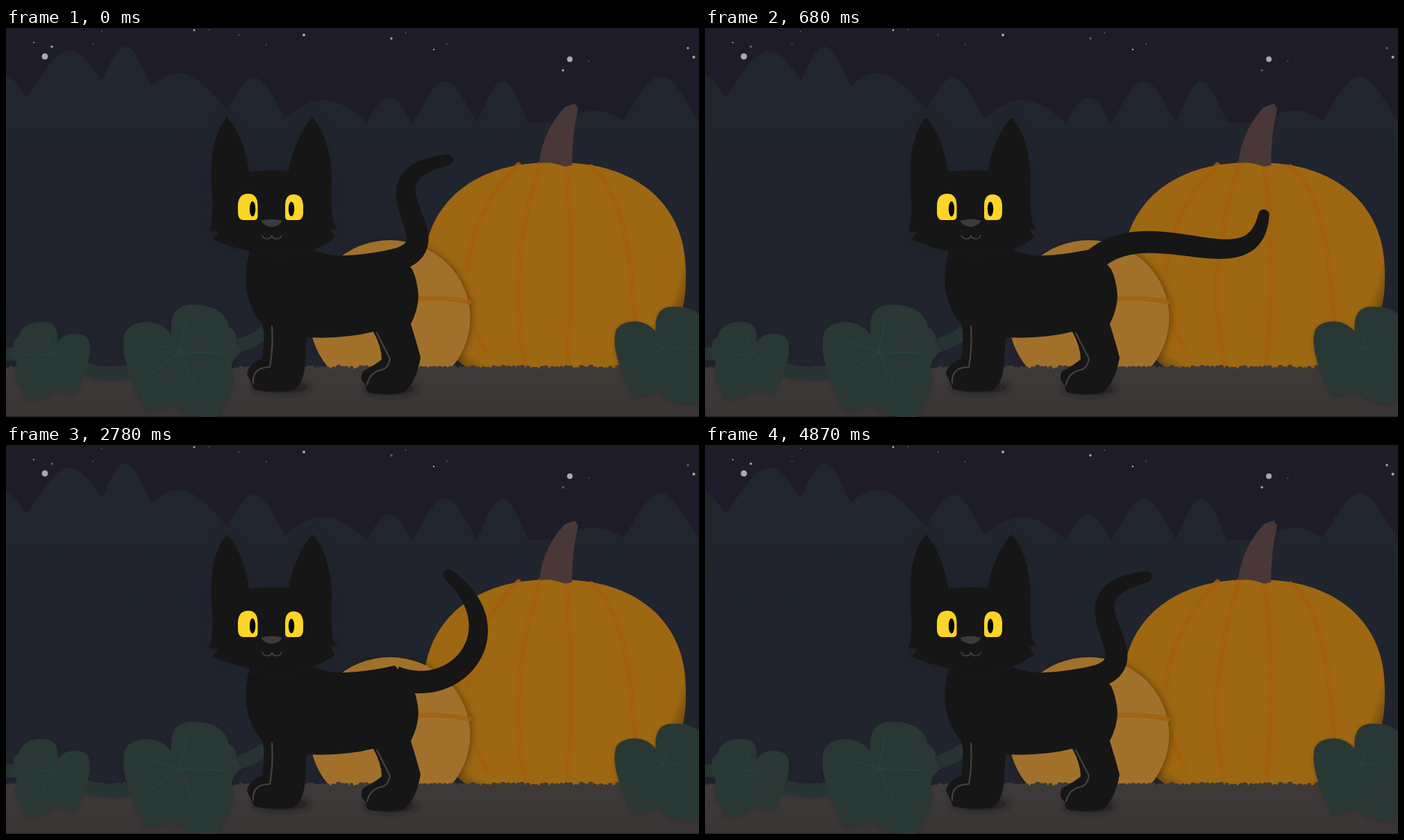
An HTML page for the animation above (5000 ms loop, 998 by 561 pixels).

```html
<!DOCTYPE html>
<html lang="en">
<head>
<meta charset="utf-8">
<title>Night cat</title>
<style>
html, body { margin: 0; width: 100%; height: 100%; overflow: hidden; background: #1f1c29; }
svg { display: block; width: 100%; height: 100%; }
.line { fill: none; stroke-linecap: round; stroke-linejoin: round; }
.leaf { fill: #293735; }
.vein { stroke: #24433c; stroke-width: 2; }
.vine { stroke: #263433; stroke-width: 19; stroke-linecap: butt; }
.rib { stroke: #a3600f; stroke-width: 7; opacity: .8; }
.grey { stroke: #434343; stroke-width: 2.2; }
.plants { filter: drop-shadow(0 2px 3px rgba(0,0,0,.15)); }
.small { filter: drop-shadow(2px 0 5px rgba(40,20,0,.45)); }
.head { filter: drop-shadow(0 0 7px rgba(30,28,46,.5)); }
</style>
</head>
<body>
<svg viewBox="0 0 998 561" preserveAspectRatio="none">
  <defs>
    <linearGradient id="night" x2="0" y2="1">
      <stop stop-color="#21272f"/><stop offset=".35" stop-color="#20242e"/><stop offset="1" stop-color="#21242f"/>
    </linearGradient>
    <linearGradient id="soil" x2="0" y2="1"><stop stop-color="#3e3a39"/><stop offset="1" stop-color="#393534"/></linearGradient>
    <radialGradient id="shade" gradientUnits="userSpaceOnUse" cx="780" cy="310" r="245">
      <stop offset=".8" stop-color="#9e6711"/><stop offset="1" stop-color="#2f200d"/>
    </radialGradient>
    <filter id="blur" x="-30%" y="-100%" width="160%" height="300%"><feGaussianBlur stdDeviation="5"/></filter>
    <g id="leaf">
      <path class="leaf" d="M-79-27Q-72-43-45-43Q-26-42-12-26Q-16-68 18-68Q64-68 71-36Q80-31 82-22Q80-14 90-1Q72 14 75 27Q82 50 62 76Q58 96 48 96Q10 94-9 74Q-40 86-50 83Q-66 50-69 40Q-86 0-79-27Z"/>
      <path class="line vein" d="M0 0L-45-15M0 0L9-42M0 0L62 2M0 0L22 49M0 0L-39 30"/>
    </g>
  </defs>

  <rect width="998" height="561" fill="#1f1c29"/>
  <path id="mountains" fill="url(#night)"/>
  <g id="stars" fill="#a9a9ad"></g>

  <path id="pumpkin" fill="url(#shade)"/>
  <g class="line rib">
    <path d="M738 197Q672 262 664 350M672 415Q676 440 692 468M770 195C752 250 737 320 737 390Q739 440 748 488"/>
    <path d="M806 201C816 270 817 400 808 490M843 200C885 232 900 320 906 425"/>
  </g>
  <path fill="#4a3839" d="M768 195Q773 148 805 114L819 109L824 116Q815 155 815 198L805 200Q785 192 768 195Z"/>
  <g class="small">
    <ellipse cx="553" cy="418" rx="115.5" ry="112" fill="#a1712b"/>
    <path class="line rib" d="M592 390Q630 388 667 395"/>
  </g>

  <path class="line vine" d="M325 459Q350 457 374 438"/>
  <g id="ground" fill="#3e3a39">
    <path fill="url(#soil)" d="M0 491H998V561H0Z"/>
  </g>
  <rect y="560" width="998" height="1" fill="#252423"/>

  <g class="plants">
    <path class="line vine" d="M-5 470H18M108 490Q140 502 176 497"/>
    <use href="#leaf" transform="translate(66 470) scale(-.68 .68)"/>
    <use href="#leaf" transform="translate(250 467)"/>
    <use href="#leaf" transform="translate(946 460) scale(.86)"/>
  </g>

  <g fill="#171515" opacity=".7" filter="url(#blur)">
    <ellipse cx="396" cy="518" rx="42" ry="9"/><ellipse cx="554" cy="521" rx="38" ry="9"/>
  </g>
  <g fill="#161616">
    <path id="tail"/>
    <path d="M352 320Q343 345 346 375Q350 405 369 427Q374 440 369 477Q349 484 347 499Q354 512 357 521Q385 527 414 523Q430 512 431 480L433 446Q485 449 529 438Q541 460 541 478Q530 487 514 495Q508 508 519 515Q516 527 530 527Q560 530 574 525Q592 508 597 475Q591 452 583 427Q594 405 594 385Q592 362 585 348L560 318L546 321Q515 327 490 328Q465 330 441 319Z"/>
    <path class="head" d="M350 207Q378 204 407 206C413 175 424 149 441 129C458 147 467 175 469 215Q467 255 471 280L477 289L467 291L474 302Q460 313 441 320Q395 335 352 322Q322 316 298 305L306 294L293 293Q299 270 297 245Q294 210 297 185C300 160 307 142 318 129C335 147 345 175 350 207Z"/>
    <path class="line grey" d="M383 430Q385 462 380 489Q366 489 360 496Q355 503 356 512M534 440L553 477Q550 492 540 493Q524 497 520 514"/>
    <path fill="#3b3b3b" d="M367 278Q383 273 398 278Q393 286 383 287Q372 286 367 278Z"/>
    <path class="line grey" style="stroke-width:1.6" d="M369 299Q371 304 376 304Q382 304 383 299Q384 304 390 304Q395 304 397 299"/>
    <g class="eye" data-x="351">
      <path fill="#fdd526" d="M334 257Q334 239 349 239Q362 239 362.500 256V272Q362 277 357 277H342Q334 277 334 265Z"/>
      <ellipse cx="355" cy="261" rx="4.2" ry="11" fill="#050505"/>
    </g>
    <g class="eye" data-x="412">
      <path fill="#fdd526" d="M402 257Q402 240 414 240Q428 240 428 258V265Q428 277 420 277H407Q402 277 402 272Z"/>
      <ellipse cx="411" cy="261" rx="4.2" ry="10.500" fill="#050505"/>
    </g>
  </g>
</svg>
<script>
const LOOP = 5000;
const byId = id => document.getElementById(id);
const clamp = x => Math.max(0, Math.min(1, x));
const ease = x => { x = clamp(x); return x * x * (3 - 2 * x); };

let seed = 7;
const random = () => (seed = seed * 16807 % 2147483647) / 2147483647;

function addCircle(parent, cx, cy, r) {
  const el = document.createElementNS('http://www.w3.org/2000/svg', 'circle');
  for (const [k, v] of Object.entries({ cx, cy, r })) el.setAttribute(k, v);
  return byId(parent).appendChild(el);
}

// Skyline: the highest of several bell-shaped mountains [x, top, width]
const mountains = [
  [-8, 66, 62], [92, 33, 65], [172, 27, 44], [248, 65, 88], [357, 72, 52], [457, 104, 105],
  [552, 100, 50], [632, 77, 52], [715, 77, 42], [848, 119, 108], [943, 70, 58]
];
let skyline = 'M0 561';
for (let x = 0; x <= 998; x += 2) {
  skyline += `L${x} ${Math.min(...mountains.map(([cx, top, w]) => top + 110 * (1 - Math.exp(-(((x - cx) / w) ** 2)))))}`;
}
byId('mountains').setAttribute('d', skyline + 'L998 561Z');

// The pumpkin is a superellipse
const power = v => Math.sign(v) * Math.abs(v) ** (2 / 2.3);
let outline = [];
for (let a = 0; a < 2 * Math.PI; a += .03) {
  outline.push([790 + 189 * power(Math.cos(a)), 358 + 164 * power(Math.sin(a))]);
}
byId('pumpkin').setAttribute('d', `M${outline.join('L')}Z`);

for (let x = 0; x < 885; x += 7) addCircle('ground', x + 3 * random(), 490 + 3 * random(), 3 + 2 * random());

for (const star of [[56, 41, 4.5], [812, 45, 4], [429, 10, 2], [990.5, 42, 2], [271, 3, 1.5], [616, 31, 1.2], [40, 21, 1.1]]) {
  addCircle('stars', ...star);
}
for (let i = 0; i < 8; i++) addCircle('stars', 100 + 850 * random(), 50 * random(), .8).setAttribute('opacity', .7);
const twinkling = [[66, 27], [555, 15], [802, 61], [982, 29]].map(([x, y]) => addCircle('stars', x, y, 1.7));

// Tail poses: two handles and the tip of a Bézier curve from a fixed root
const root = [560, 335];
const rest = [655, 310, 497, 217, 636, 190];
const poses = [
  rest,
  [650, 375, 785, 285, 650, 191],
  [644, 275, 788, 394, 802, 242],
  [650, 235, 760, 250, 745, 375],
  rest
];
const poseTimes = [0, 480, 650, 800, 1010];

function tailPose(t) {
  if (t <= 0 || t >= 1010) return rest;
  const i = poseTimes.findIndex(time => time > t) - 1;
  const u = (t - poseTimes[i]) / (poseTimes[i + 1] - poseTimes[i]);
  const [p, a, b, q] = [poses[i - 1] || rest, poses[i], poses[i + 1], poses[i + 2] || rest];
  return a.map((v, k) => v + u / 2 * (b[k] - p[k]
    + u * (2 * p[k] - 5 * v + 4 * b[k] - q[k] + u * (3 * (v - b[k]) + q[k] - p[k]))));
}

function tailPath(pose) {
  const points = [...root, ...pose], steps = 40, left = [], right = [];
  let r;
  for (let i = 0; i <= steps; i++) {
    const s = i / steps, v = 1 - s;
    const [x, y] = [0, 1].map(k => v ** 3 * points[k] + 3 * v * v * s * points[k + 2] + 3 * v * s * s * points[k + 4] + s ** 3 * points[k + 6]);
    const [dx, dy] = [0, 1].map(k => v * v * (points[k + 2] - points[k])
      + 2 * v * s * (points[k + 4] - points[k + 2]) + s * s * (points[k + 6] - points[k + 4]));
    r = 16.5 - 2 * s - 6.5 * s ** 4;
    const nx = -dy / Math.hypot(dx, dy) * r, ny = dx / Math.hypot(dx, dy) * r;
    left.push([x - nx, y - ny]);
    right.unshift([x + nx, y + ny]);
  }
  return `M${left.join('L')}A${r} ${r} 0 0 1 ${right.join('L')}Z`;
}

function draw(now) {
  const t = now % LOOP;
  byId('tail').setAttribute('d', tailPath(tailPose(t < 2000 ? t : t - 2410)));

  const open = clamp(Math.min(Math.abs(t - 2060), Math.abs(t - 3750)) / 150);
  for (const eye of document.querySelectorAll('.eye')) {
    const x = eye.dataset.x;
    eye.setAttribute('transform', `translate(${x} 265) scale(${.75 + .25 * open} ${Math.max(.06, open)}) translate(${-x} -265)`);
  }

  const dimmed = ease(t / 520) * (1 - ease((t - 4350) / 520));
  for (const star of twinkling) star.setAttribute('opacity', 1 - .5 * dimmed);
  requestAnimationFrame(draw);
}
requestAnimationFrame(draw);
</script>
</body>
</html>
```
